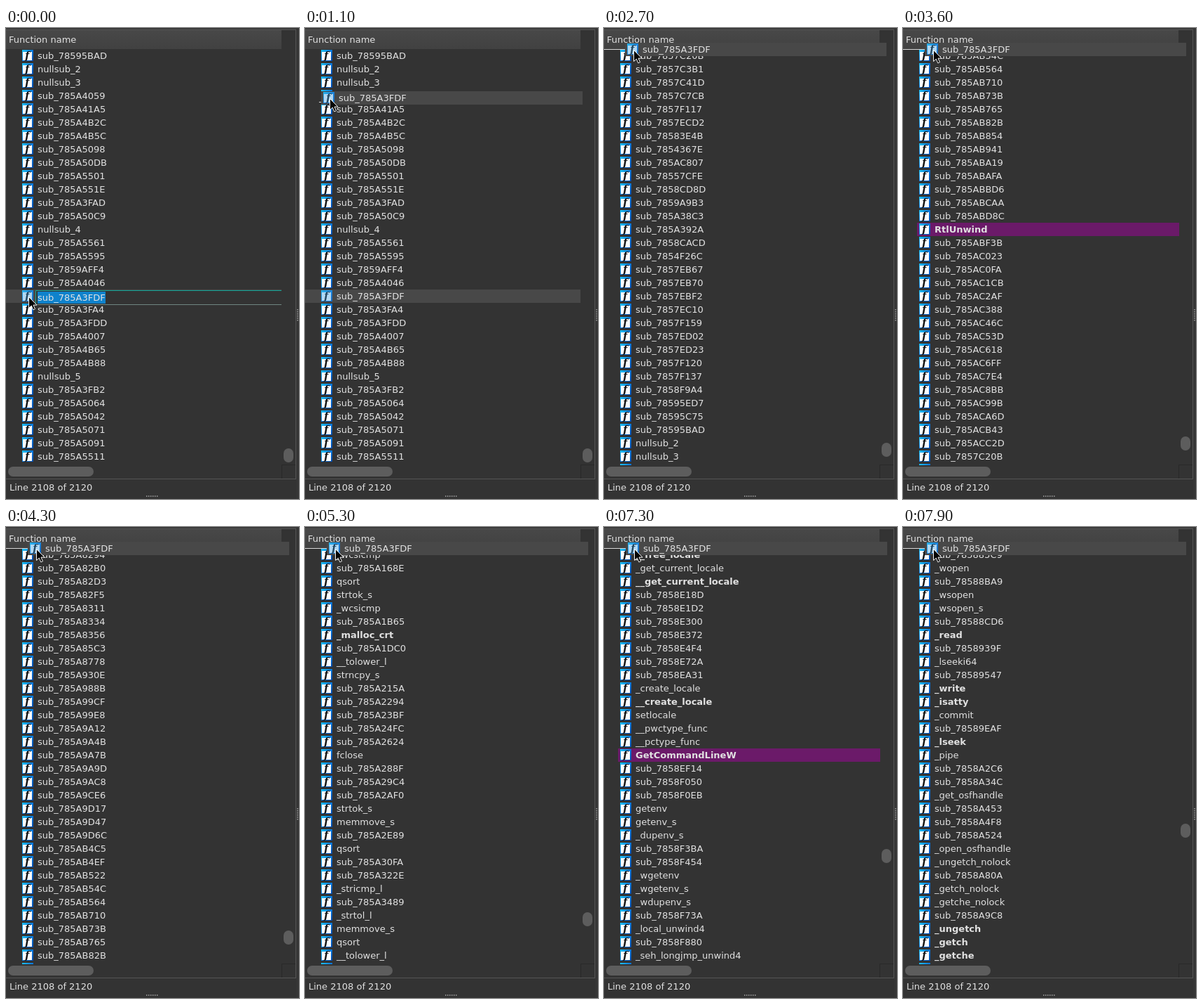
An HTML page for the animation above (8 s loop, 418 by 670 pixels).

```html
<!DOCTYPE html>
<html lang="en">
<head>
<meta charset="utf-8">
<title>Function list drag</title>
<style>
html, body { margin: 0; width: 100%; height: 100%; overflow: hidden; background: #333; }
svg { display: block; width: 418px; height: 670px; }
text { font: 13px "DejaVu Sans", sans-serif; fill: #e1e1e1; white-space: pre; }
.bold { font-weight: bold; }
.glyph { font: italic bold 14px "DejaVu Serif", "Noto Serif", serif; fill: #111; }
</style>
</head>
<body>
<svg viewBox="0 0 418 670" xmlns="http://www.w3.org/2000/svg">
  <defs>
    <linearGradient id="edge" x2="1" y2="1">
      <stop offset="0" stop-color="#20c8f4"/><stop offset=".5" stop-color="#0a78dc"/><stop offset="1" stop-color="#0648a8"/>
    </linearGradient>
    <linearGradient id="head" x2="0" y2="1">
      <stop offset="0" stop-color="#484848"/><stop offset="1" stop-color="#414141"/>
    </linearGradient>
    <g id="icon">
      <rect width="16" height="16" fill="url(#edge)"/>
      <rect x="1" y="3" width="13" height="12" fill="#fafdff"/>
      <text class="glyph" x="4.2" y="13">f</text>
    </g>
    <g id="pickedIcon">
      <use href="#icon"/>
      <rect width="16" height="16" fill="#3a9be0" opacity=".38"/>
    </g>
    <clipPath id="view"><rect y="30" width="394" height="592"/></clipPath>
  </defs>

  <rect width="418" height="670" fill="#333"/>
  <rect width="414" height="2" fill="#3a3a3a"/>
  <rect y="2" width="413" height="1" fill="#555"/>
  <rect y="3" width="393" height="27" fill="url(#head)"/>
  <text x="4" y="21">Function name</text>
  <g id="list" clip-path="url(#view)"></g>

  <g id="edit">
    <rect x="42" y="373" width="351" height="21" fill="#333"/>
    <path d="M393 373.5H42.5V393" fill="none" stroke="#12a698"/>
    <path d="M42 393.5H393" stroke="#6f8580"/>
    <rect x="45" y="375" width="97" height="17" fill="#0f82cc"/>
    <text x="45" y="388">sub_785A3FDF</text>
  </g>

  <rect id="thumb" x="396" width="14" height="20" rx="7" fill="#5d5d5d"/>
  <rect x="3" y="624" width="122" height="14" rx="7" fill="#5d5d5d"/>
  <path d="M393 621.5H413M393.5 621V641" stroke="#292929"/>
  <path d="M0 641.5H414M413.5 2V641" stroke="#555"/>
  <rect x="414" width="4" height="670" fill="#363636"/>
  <path d="M416 400V417" stroke="#8a8a8a" stroke-width="2" stroke-dasharray="1.5 1.5"/>
  <path d="M200 666H217" stroke="#8a8a8a" stroke-width="2" stroke-dasharray="1.5 1.5"/>
  <text x="5" y="658">Line 2108 of 2120</text>

  <rect id="drop" height="1" fill="#d8d8d8"/>
  <g id="ghost">
    <rect x="20" y="372" width="373" height="19" fill="#484848"/>
    <use href="#pickedIcon" x="23" y="373"/>
    <text x="45" y="386">sub_785A3FDF</text>
  </g>
  <path id="cursor" d="M0 0V16L3.8 12.6L6.3 18.4L9 17.2L6.5 11.6H11.5Z" fill="#050505" stroke="#f4f4f4"/>
</svg>
<script>
const ROW = 19, TOP = 30, SHOWN = 32, LOOP = 8000, FRAME = 100, PICKED = 18;
const el = id => document.getElementById(id);

// Row numbers count from the top of the last page. "*" is bold, "!" is an import.
const blocks = {
  0: `sub_78595BAD nullsub_2 nullsub_3 sub_785A4059 sub_785A41A5 sub_785A4B2C sub_785A4B5C
    sub_785A5098 sub_785A50DB sub_785A5501 sub_785A551E sub_785A3FAD sub_785A50C9 nullsub_4
    sub_785A5561 sub_785A5595 sub_7859AFF4 sub_785A4046 sub_785A3FDF sub_785A3FA4 sub_785A3FDD
    sub_785A4007 sub_785A4B65 sub_785A4B88 nullsub_5 sub_785A3FB2 sub_785A5064 sub_785A5042
    sub_785A5071 sub_785A5091 sub_785A5511`,
  "-28": `sub_7857C20B sub_7857C3B1 sub_7857C41D sub_7857C7CB sub_7857F117 sub_7857ECD2
    sub_78583E4B sub_7854367E sub_785AC807 sub_78557CFE sub_7858CD8D sub_7859A9B3 sub_785A38C3
    sub_785A392A sub_7858CACD sub_7854F26C sub_7857EB67 sub_7857EB70 sub_7857EBF2 sub_7857EC10
    sub_7857F159 sub_7857ED02 sub_7857ED23 sub_7857F120 sub_7857F137 sub_7858F9A4 sub_78595ED7
    sub_78595C75`,
  "-45": `!RtlUnwind`,
  "-83": `sub_785A8294 sub_785A82B0 sub_785A82D3 sub_785A82F5 sub_785A8311 sub_785A8334
    sub_785A8356 sub_785A85C3 sub_785A8778 sub_785A930E sub_785A988B sub_785A99CF sub_785A99E8
    sub_785A9A12 sub_785A9A4B sub_785A9A7B sub_785A9A9D sub_785A9AC8 sub_785A9CE6 sub_785A9D17
    sub_785A9D47 sub_785A9D6C sub_785AB4C5 sub_785AB4EF sub_785AB522 sub_785AB54C sub_785AB564
    sub_785AB710 sub_785AB73B sub_785AB765 sub_785AB82B`,
  "-286": `_CIasin sub_7859ABE8 atan _CIatan sub_7859AD38 atan2 _CIatan2 cos _CIcos sub_7859AE78
    sinh cosh tanh _CIsinh _CIcosh _CItanh exp _CIexp fmod _CIfmod log _CIlog sub_7859B0B8 log10
    _CIlog10 sub_7859B218 pow _CIpow sub_7859B37D sub_7859B542 sin`,
  "-490": `*__free_locale _get_current_locale *__get_current_locale sub_7858E18D sub_7858E1D2
    sub_7858E300 sub_7858E372 sub_7858E4F4 sub_7858E72A sub_7858EA31 _create_locale
    *__create_locale setlocale __pwctype_func __pctype_func !GetCommandLineW sub_7858EF14
    sub_7858F050 sub_7858F0EB getenv getenv_s _dupenv_s sub_7858F3BA sub_7858F454 _wgetenv
    _wgetenv_s _wdupenv_s sub_7858F73A _local_unwind4 sub_7858F880 _seh_longjmp_unwind4`,
  "-615": `sub_785883C9 _wopen sub_78588BA9 _wsopen _wsopen_s sub_78588CD6 *_read sub_7858939F
    _lseeki64 sub_78589547 *_write *_isatty _commit sub_78589EAF *_lseek _pipe sub_7858A2C6
    sub_7858A34C _get_osfhandle sub_7858A453 sub_7858A4F8 sub_7858A524 _open_osfhandle
    _ungetch_nolock sub_7858A80A _getch_nolock _getche_nolock sub_7858A9C8 *_ungetch *_getch
    *_getche`
};
const names = new Map();
for (const [start, words] of Object.entries(blocks))
  words.split(/\s+/).forEach((word, i) => names.set(+start + i, word));

function along(points, x) {
  const last = points[points.length - 1];
  if (x <= points[0][0]) return points[0].slice(1);
  if (x >= last[0]) return last.slice(1);
  const i = points.findIndex(p => p[0] > x), a = points[i - 1], b = points[i];
  const k = (x - a[0]) / (b[0] - a[0]);
  return a.slice(1).map((v, j) => v + (b[j + 1] - v) * k);
}

// Rows in between get rising addresses mixed with C runtime names.
const addresses = [[-615, 0x785883c9], [-584, 0x7858aa40], [-490, 0x7858e100], [-459, 0x7858f8c0],
  [-286, 0x7859abe8], [-255, 0x7859b560], [-84, 0x785a8270], [-52, 0x785ab850], [-29, 0x785acc20]];
const runtime = `_strtol_l *_free_base strncpy_s _wcsicmp _isdigit_l *_malloc_crt toupper fclose
  _fileno *__lock_file wcstol _stricmp_l memmove_s *_close qsort strtok_s _fputc_nolock
  __tolower_l _vsnprintf *_errno`.split(/\s+/);
const noise = n => { const v = Math.sin(n * 12.9898) * 43758.5453; return v - Math.floor(v); };

function nameAt(row) {
  if (names.has(row)) return names.get(row);
  if (row > 30) return "";
  if (row < -120 && noise(row) < 0.4) return runtime[Math.floor(noise(row + 0.5) * runtime.length)];
  const address = Math.floor(along(addresses, row)[0] + noise(row) * 24);
  return "sub_" + address.toString(16).toUpperCase();
}

// Auto-scroll moves 1, 2, 3... rows per tick; a nudge of the pointer restarts it.
const TICK = 140, SCROLL_START = 1660, NUDGE = 3190, MAX_STEP = 32;
function ramp(ms) {
  const n = Math.max(0, Math.floor(ms / TICK)), m = Math.min(n, MAX_STEP);
  return m * (m + 1) / 2 + (n - m) * MAX_STEP;
}
const scrollAt = t => ramp(Math.min(t, NUDGE) - SCROLL_START) + ramp(t - NUDGE);

const path = [[300, 0, 0], [600, 0, -25], [900, 1, -135], [1100, 3, -282], [1300, 6, -335],
  [1500, 10, -356], [1700, 10, -351], [NUDGE - 1, 10, -351], [NUDGE, 11, -351]];

function make(tag, attrs, parent) {
  const node = document.createElementNS("http://www.w3.org/2000/svg", tag);
  for (const key in attrs) node.setAttribute(key, attrs[key]);
  return parent.appendChild(node);
}
const rows = Array.from({ length: SHOWN }, (_, i) => {
  const g = make("g", { transform: `translate(0 ${TOP + i * ROW})` }, el("list"));
  return {
    g,
    back: make("rect", { height: ROW }, g),
    icon: make("use", { x: 23, y: 1 }, g),
    label: make("text", { x: 45, y: 14 }, g)
  };
});
const show = (node, on) => node.setAttribute("display", on ? "inline" : "none");

function drawRow({ g, back, icon, label }, row, editing) {
  const name = nameAt(row), picked = row === PICKED, imported = name[0] === "!";
  show(g, name);
  show(back, picked || imported);
  back.setAttribute("x", picked ? 0 : 20);
  back.setAttribute("width", picked ? 393 : 374);
  back.setAttribute("fill", picked ? "#484848" : "#6b1a69");
  icon.setAttribute("href", picked ? "#pickedIcon" : "#icon");
  label.setAttribute("class", /^[*!]/.test(name) ? "bold" : "");
  label.textContent = picked && editing ? "" : name.replace(/^[*!]/, "");
}

function draw(t) {
  const scroll = scrollAt(t), [dx, dy] = along(path, t).map(Math.round);
  const editing = t < 300, dragging = t > 300;
  rows.forEach((parts, i) => drawRow(parts, i - scroll, editing));
  show(el("edit"), editing);
  show(el("ghost"), dragging);
  show(el("drop"), dragging);
  el("ghost").setAttribute("transform", `translate(${dx} ${dy})`);
  el("cursor").setAttribute("transform", `translate(${32.5 + dx} ${382.5 + dy})`);
  el("thumb").setAttribute("y", Math.round(598 - scroll * 0.286));

  const pointer = 383 + dy, atTop = pointer < 40;
  const edge = atTop ? TOP : TOP + Math.round((pointer - TOP) / ROW) * ROW - 1;
  el("drop").setAttribute("x", atTop ? 0 : 20);
  el("drop").setAttribute("width", atTop ? 393 : 373);
  el("drop").setAttribute("y", edge);
}

function tick(now) {
  draw(Math.floor(now % LOOP / FRAME) * FRAME);
  requestAnimationFrame(tick);
}
draw(0);
requestAnimationFrame(tick);
</script>
</body>
</html>
```
